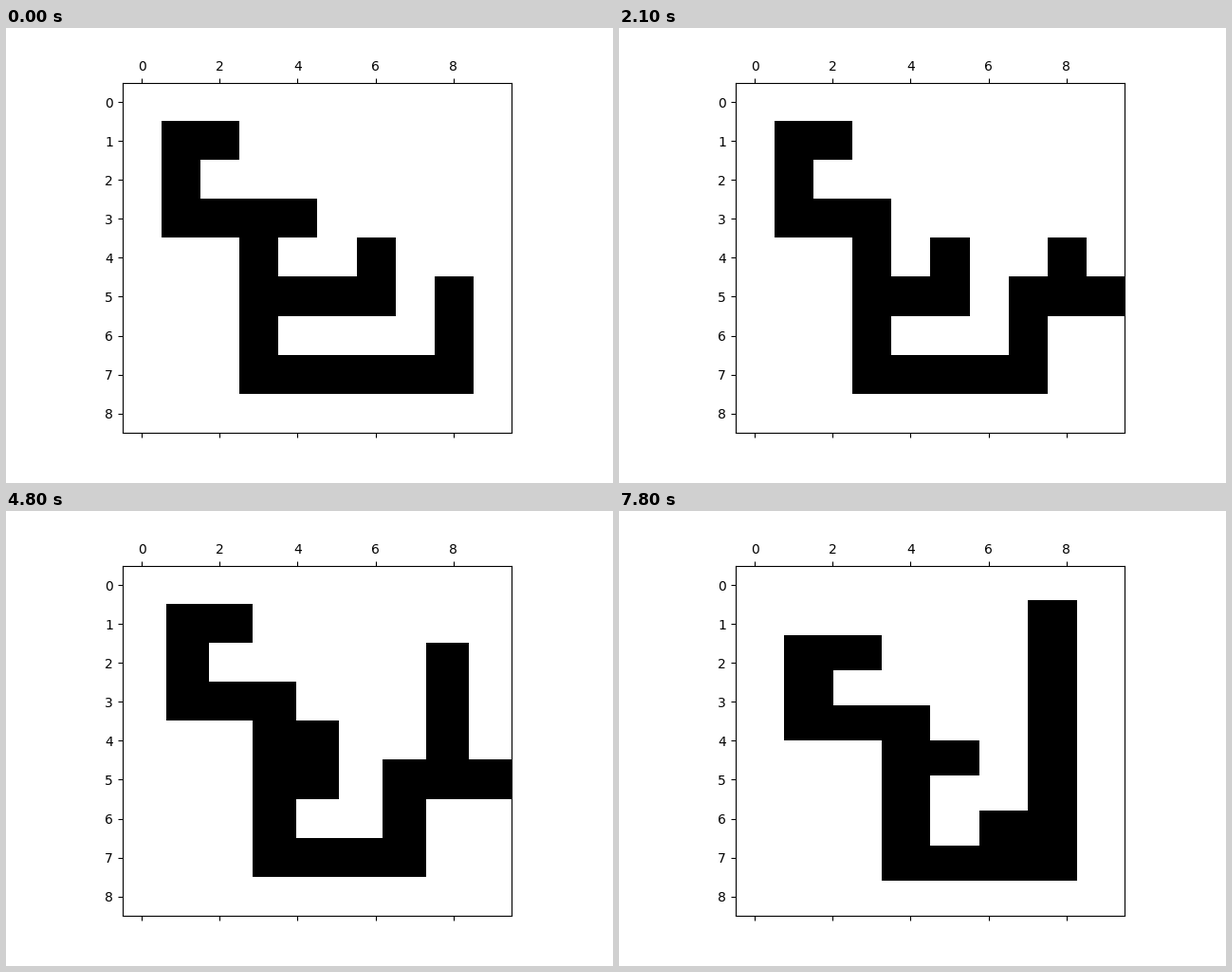
Recreate the animation shown at these times as a matplotlib script. Size 640x480 px, loop 8000 ms.

```python
import numpy as np
import matplotlib.pyplot as plt
from matplotlib.animation import FuncAnimation

INTERVAL = 100       # ms per drawn frame
FRAMES = 80
HOLD = 3             # drawn frames per move

# Directions as (row, column) steps.
UP, UP_LEFT, UP_RIGHT, DOWN_RIGHT = (-1, 0), (-1, -1), (-1, 1), (1, 1)


def stroke(*corners):
    """Cells on the straight runs between the given corners."""
    cells = set()
    for (r0, c0), (r1, c1) in zip(corners, corners[1:]):
        rows = range(min(r0, r1), max(r0, r1) + 1)
        cols = range(min(c0, c1), max(c0, c1) + 1)
        cells |= {(r, c) for r in rows for c in cols}
    return cells


class Shape:
    """A connected set of cells that changes by moving one cell at a time."""

    def __init__(self, cells):
        self.cells = cells
        self.history = [cells]

    def move(self, cell, step):
        dest = (cell[0] + step[0], cell[1] + step[1])
        self.cells = (self.cells - {cell}) | {dest}
        self.history.append(self.cells)
        return dest

    def hop(self, *cell):
        """Bridge a gap on the inside."""
        self.move(cell, DOWN_RIGHT)

    def fold(self, *cell):
        """Flip a corner inward."""
        self.move(cell, UP_LEFT)

    def climb(self, *cell):
        """Step outside, follow the wall up and settle on top of it."""
        row, col = self.move(cell, UP_RIGHT)
        while (row - 1, col - 1) in self.cells:
            row, col = self.move((row, col), UP)
        self.move((row, col), UP_LEFT)

    def sweep(self, col):
        """Fold a whole column, lowest cell first."""
        for cell in sorted(self.cells, reverse=True):
            if cell[1] == col:
                self.fold(*cell)


def simulate():
    shape = Shape(
        stroke((1, 2), (1, 1), (3, 1), (3, 3), (7, 3), (7, 8), (5, 8))
        | stroke((3, 3), (3, 4))
        | stroke((5, 3), (5, 6), (4, 6)))

    shape.hop(3, 4)
    shape.hop(5, 6)
    shape.climb(7, 8)

    shape.hop(4, 6)
    shape.climb(6, 8)
    shape.sweep(8)

    shape.hop(4, 5)
    shape.fold(7, 7)
    shape.fold(5, 5)
    shape.climb(6, 7)
    shape.sweep(7)

    shape.hop(5, 4)
    return shape.history


def to_grid(previous, current):
    """Rasterise; the grid trims at once but grows one move late."""
    old, new = np.array(list(previous)), np.array(list(current))
    first = np.maximum(old.min(axis=0), new.min(axis=0)) - 1
    last = np.minimum(old.max(axis=0), new.max(axis=0)) + 1
    grid = np.zeros(last - first + 1)
    rows, cols = (new - first).T
    grid[rows, cols] = 1
    return grid


states = simulate()
grids = [to_grid(a, b) for a, b in zip(states[:1] + states, states)]

fig, ax = plt.subplots(figsize=(6.4, 4.8), dpi=100)
# The extent stays that of the first grid, so later grids stretch to fit.
image = ax.matshow(grids[0], cmap="binary", vmin=0, vmax=1)


def update(frame):
    image.set_data(grids[min(frame // HOLD, len(grids) - 1)])
    return [image]


anim = FuncAnimation(fig, update, frames=FRAMES, interval=INTERVAL,
                     repeat=True, repeat_delay=0, blit=False)
plt.show()
```
